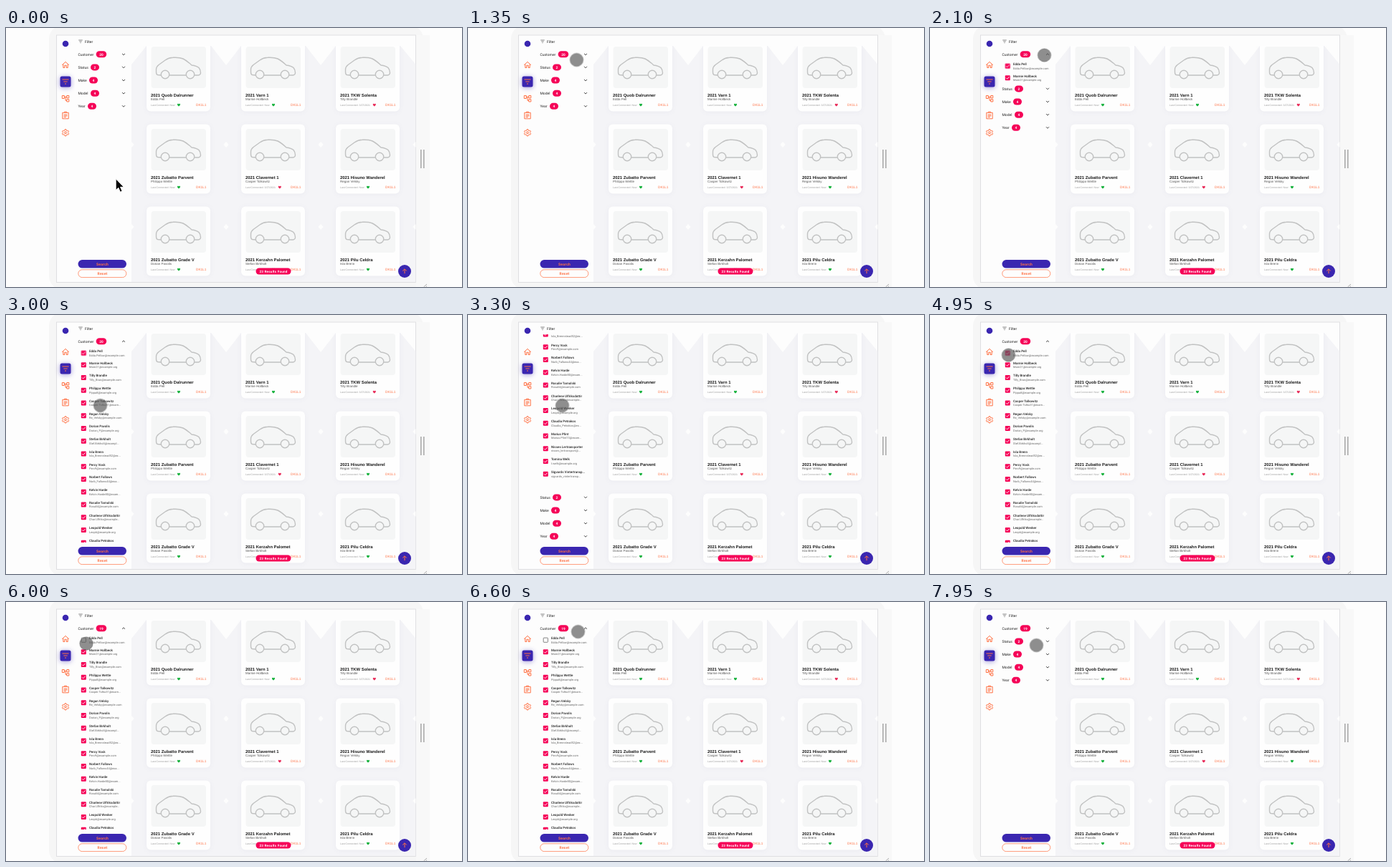
These frames come from a looping animation (636x362 px, 8000 ms). An HTML page:

```html
<!DOCTYPE html>
<html lang="en">
<head>
<meta charset="utf-8">
<title>Vehicle filter</title>
<style>
html, body { margin: 0; width: 100%; height: 100%; overflow: hidden; background: #fdfdfd; }
svg { display: block; width: 636px; height: 362px; }
text { font-family: Roboto, "Open Sans", sans-serif; font-size: 5px; fill: #222; text-rendering: geometricPrecision; }
.card text { font-family: "Liberation Sans", Arial, sans-serif; }
.card .title { font-size: 5.9px; font-weight: 700; fill: #1c1c1c; }
.card .owner { font-size: 4.5px; fill: #555; }
.card .seen { font-size: 3.5px; fill: #999; }
.card .code { font-size: 4.7px; fill: #ff7043; }
.card > rect:first-child { filter: drop-shadow(0 1.5px 3px rgba(60, 60, 110, .05)); }
.badge { font-size: 4.8px; font-weight: 700; fill: #fff; text-anchor: middle; }
.name { font-size: 4.5px; font-weight: 500; }
.mail { font-size: 4px; fill: #666; }
.btn { font-weight: 700; letter-spacing: .25px; text-anchor: middle; fill: #ff7043; }
.found { font-size: 4.6px; font-weight: 700; letter-spacing: .2px; fill: #fff; text-anchor: middle; }
.line { fill: none; stroke: #333; stroke-width: .9; }
.icon { fill: none; stroke: #ff7043; stroke-width: 1; stroke-linejoin: round; }
.active { fill: #3a26b0; filter: drop-shadow(0 1.5px 3.5px rgba(58, 38, 176, .45)); }

#scroll, #rest, #flip, #arrow, #touch, .before, .after { animation: 8s step-end infinite; }
#scroll { animation-name: scroll; }
#rest { animation-name: expand; }
#flip { animation-name: flip; }
#arrow { animation-name: arrow; }
#touch { animation-name: touch; }
.before { animation-name: before; }
.after { animation-name: after; }

@keyframes scroll {
  0% { transform: translateY(0); }
  39.37% { transform: translateY(-70px); }
  41.24% { transform: translateY(-167px); }
  48.74% { transform: translateY(-100.5px); }
  50.62%, 100% { transform: translateY(0); }
}
@keyframes expand {
  0% { transform: translateY(0); }
  26.24% { transform: translateY(30px); }
  28.12% { transform: translateY(240px); }
  29.99% { transform: translateY(367px); }
  91.87% { transform: translateY(270px); }
  93.74% { transform: translateY(50px); }
  95.62%, 100% { transform: translateY(0); }
}
@keyframes flip {
  0% { transform: scaleY(1); }
  26.24% { transform: scaleY(-1); }
  91.87%, 100% { transform: scaleY(1); }
}
@keyframes before { 0% { opacity: 1; } 67.49%, 100% { opacity: 0; } }
@keyframes after { 0% { opacity: 0; } 67.49%, 100% { opacity: 1; } }
@keyframes arrow { 0% { opacity: 1; } 11.24%, 100% { opacity: 0; } }
@keyframes touch {
  0% { opacity: 0; transform: translate(153px, 211px); }
  11.24% { opacity: 1; transform: translate(150px, 190px); }
  13.12% { transform: translate(148px, 132px); }
  14.99% { transform: translate(148px, 74px); }
  16.87% { transform: translate(151.5px, 44.5px); }
  18.74% { transform: translate(156px, 40px); }
  20.62% { transform: translate(158.5px, 38.5px); }
  22.49% { transform: translate(159.5px, 38px); }
  29.99% { transform: translate(157px, 48px); }
  31.87% { transform: translate(149px, 76px); }
  33.74% { transform: translate(140px, 104px); }
  35.62% { transform: translate(133px, 121px); }
  37.49% { transform: translate(131.5px, 126.5px); }
  56.24% { transform: translate(135px, 127px); }
  58.12% { transform: translate(126px, 98px); }
  59.99% { transform: translate(114px, 66px); }
  61.87% { transform: translate(109.5px, 56px); }
  74.99% { transform: translate(112px, 58px); }
  76.87% { transform: translate(126px, 55px); }
  78.74% { transform: translate(142px, 48px); }
  80.62% { transform: translate(151px, 43px); }
  82.49% { transform: translate(153.5px, 41.5px); }
  95.62% { transform: translate(152.5px, 46px); }
  97.49% { transform: translate(150px, 55px); }
  99.37%, 100% { opacity: 1; transform: translate(148.5px, 60.5px); }
}
</style>
</head>
<body>
<svg viewBox="0 0 636 362">
  <defs>
    <clipPath id="panel"><rect x="96" y="27.5" width="78" height="290.5"/></clipPath>
    <clipPath id="grid"><rect x="175" y="25" width="396.5" height="330"/></clipPath>
    <g id="car" fill="none" stroke="#c1c2c2" stroke-width="1.4" stroke-linecap="round" stroke-linejoin="round">
      <circle cx="26" cy="45.5" r="5.700"/>
      <circle cx="61" cy="45.5" r="5.700"/>
      <path d="M20 46.500L15.500 46Q13.500 45.500 13.500 42V38Q13.500 35 17 32L26 25.500Q31 22 37 21.800Q46 21.300 51 23.500Q56 26 63 32.500Q70 33.500 73 36Q75.500 39 75.500 43Q75.500 46 72 46.500H67M32 46.500H55"/>
    </g>
    <path id="heart" d="M0 1.900C-3 -.1 -2.100 -1.900 -1 -1.900Q-.3 -1.900 0 -1.200Q.3 -1.900 1 -1.900C2.100 -1.900 3 -.1 0 1.900Z"/>
    <path id="chevron" class="line" d="M-2 -1L0 1L2 -1"/>
    <path id="bars" d="M-4.500 -3H4.500M-2.700 0H2.700M-1 3H1"/>
    <g id="checked">
      <rect x="-3.500" y="-3.500" width="7" height="7" rx=".9" fill="#f50057"/>
      <path d="M-2.200 0L-.7 1.500L2.300 -1.600" fill="none" stroke="#fff" stroke-width=".95"/>
    </g>
  </defs>

  <rect x="60" y="-3" width="522" height="368" rx="18" fill="#f6f6f6"/>
  <path d="M572 10H591V362H572Z" fill="#f8f8f8"/>
  <rect x="70.500" y="10" width="501" height="345.500" fill="#fdfdfd" stroke="#d9d9dc" stroke-width=".8"/>
  <path d="M578.800 170V196M582.800 170V196" stroke="#aaa" stroke-width="1.600"/>
  <path d="M582.500 362L587 358M585.500 362L587 360.700" stroke="#999" stroke-width=".8"/>

  <g clip-path="url(#grid)">
    <path d="M175 51L196 25H286L307 52L328 25H418L439 52L460 25H550L571.500 51V355H175Z" fill="#f4f4f7"/>
    <g id="gems" fill="#fdfdfd"></g>
    <g id="cards"></g>
  </g>

  <rect x="348.500" y="335.500" width="49" height="9" rx="4.500" fill="#f50057"/>
  <text class="found" x="373" y="341.700">23 Results Found</text>
  <circle cx="556" cy="340" r="9" fill="#3a26b0"/>
  <path class="icon" d="M556 343.200V337M553.200 339.600L556 336.800L558.800 339.600"/>

  <circle cx="83" cy="22" r="4.300" fill="#3a26b0"/>
  <path class="icon" d="M78.300 51.700L83 47.300L87.700 51.700M79.800 50.500V55.500H81.800V52.300H84.200V55.500H86.200V50.500"/>
  <rect class="active" x="75.500" y="67.500" width="15" height="15" rx="2.500"/>
  <use href="#bars" x="83" y="75" class="icon"/>
  <path class="icon" d="M78.300 94.500H81.300V98.500H78.300ZM84.800 94.500H87.800V97.800H84.800ZM84.800 99.700H87.800V103H84.800ZM81.300 96.300H84.800M83 96.300V101.300H84.800"/>
  <path class="icon" d="M78.800 118.300H87.200V126.800H78.800ZM81.500 118V117.200H84.500V118M80.600 121H85.400M80.600 122.800H85.400M80.600 124.600H83.800"/>
  <g class="icon" transform="translate(77 140.300) scale(.5)" style="stroke-width:2">
    <path d="M10 3H14L14.500 5.800L16.500 7L19.200 6L21.200 9.400L19 11.200V12.800L21.200 14.600L19.200 18L16.500 17L14.500 18.200L14 21H10L9.500 18.200L7.500 17L4.800 18L2.800 14.600L5 12.800V11.200L2.800 9.400L4.800 6L7.500 7L9.500 5.800Z"/>
    <circle cx="12" cy="12" r="2.800"/>
  </g>

  <g transform="translate(104 18.800) scale(.62)"><use href="#bars" class="line"/></g>
  <text x="110" y="20.700">Filter</text>

  <g clip-path="url(#panel)">
    <g id="scroll">
      <g id="list"></g>
      <path d="M96 20H174V45H96Z" fill="#fdfdfd"/>
      <text x="100.500" y="38.500">Customer</text>
      <rect x="125.700" y="32.200" width="14.500" height="9" rx="4.500" fill="#f50057"/>
      <text class="badge before" x="133" y="38.500">20</text>
      <text class="badge after" x="133" y="38.500">19</text>
      <g transform="translate(164 36.800)"><g id="flip"><use href="#chevron"/></g></g>
      <g id="rest"></g>
    </g>
  </g>

  <rect x="100.500" y="324" width="67.500" height="11.600" rx="5.800" fill="#3a26b0"/>
  <text class="btn" x="134.500" y="331.600">Search</text>
  <rect x="100.800" y="337.800" width="67" height="10.800" rx="5.400" fill="#fdfdfd" stroke="#ff7043" stroke-width=".7"/>
  <text class="btn" x="134.500" y="345">Reset</text>

  <path id="arrow" d="M153.200 210.800V226.600L156.800 223.300L159.400 229.200L162 228.100L159.500 222.300H164.300Z" fill="#000" stroke="#fff" stroke-width=".9"/>
  <circle id="touch" r="9.300" fill="rgba(88,88,88,.68)" stroke="rgba(90,90,90,.5)" stroke-width=".6"/>
</svg>

<script>
const fill = (id, html) => { document.getElementById(id).innerHTML = html; };

const people = [
  ["Edda Pell", "Edda.Pellow@example.com"],
  ["Marnie Hollbeck", "Marn21@example.org"],
  ["Tilly Brandle", "Tilly_Bran@example.com"],
  ["Philippa Wettle", "Pippa8@example.org"],
  ["Casper Tolkowitz", "Casper.Tolko31@exam..."],
  ["Regan Velsky", "Re_Velsky@example.com"],
  ["Dorian Pavolis", "Dorian_P@example.org"],
  ["Stefan Birkholt", "Stef.Birkholt@exampl..."],
  ["Isla Brenn", "Isla_Brennstead52@ex..."],
  ["Percy Vosk", "Perc9@example.com"],
  ["Norbert Fallows", "Norb_Fallows44@exa..."],
  ["Kelvin Harde", "Kelvin.Harde80@exam..."],
  ["Rosalie Tarnolski", "Rosali4@example.com"],
  ["Charlene Ulfriksdottir", "Char.Ulfriks@example..."],
  ["Leopold Wenker", "Leop6@example.org"],
  ["Claudia Petrakos", "Claudia_Petrakos@ex..."],
  ["Marius Plint", "Marius.Plint73@exam..."],
  ["Nisses Lertransporter", "nisses_lertransport@..."],
  ["Tomina Welk", "t.welk@example.org"],
  ["Sigvards Vintertransp...", "sigvards_vintertransp..."]
];
const cars = ["Quob Dalrunner", "Varn 1", "TKW Solenta", "Zubatto Parvent", "Clavernet 1",
  "Hisuno Wanderel", "Zubatto Grade V", "Kerzahn Palomet", "Pilu Celdra"];
const late = [2, 4];

fill("cards", cars.map((car, i) => {
  const x = 196 + 132 * (i % 3), y = 19.5 + 115 * Math.floor(i / 3), old = late.includes(i);
  return `<g class="card" transform="translate(${x} ${y})">
    <rect width="89" height="97" rx="6" fill="#fefefe"/>
    <rect x="6.5" y="6.5" width="76.500" height="58" rx="4" fill="#f5f6f6"/>
    <use href="#car"/>
    <text class="title" x="6" y="76.200">2021 ${car}</text>
    <text class="owner" x="6" y="81.800">${people[i][0]}</text>
    <text class="seen" x="6" y="89.300">Last Connected: ${old ? "3/27/2021" : "Now"}</text>
    <use href="#heart" x="${old ? 53.8 : 45}" y="88.200" fill="${old ? "#e82a58" : "#16b13c"}"/>
    <text class="code" x="69" y="89.500">DK1L1</text>
  </g>`;
}).join(""));

fill("gems", [163, 278].map(y => [175, 307, 439, 571].map(x =>
  `<path d="M${x - 3.5} ${y}l3.500 -4l3.500 4l-3.500 4z"/>`).join("")).join(""));

fill("list", people.map(([name, mail], i) => {
  const y = i ? 49.3 + 17.75 * i : 50.5;
  const box = `<use href="#checked" x="108.300" y="${y + 2.7}"${i ? "" : ' class="before"'}/>`;
  const empty = i ? "" : `<rect class="line after" x="105.200" y="${y - .4}" width="6.200" height="6.200" rx=".7" style="stroke:#666;stroke-width:.8"/>`;
  return `${empty}${box}<text class="name" x="116" y="${y + 1.6}">${name}</text>
    <text class="mail" x="116" y="${y + 7}">${mail}</text>`;
}).join(""));

const groups = [["Status", 2, 118], ["Make", 4, 116], ["Model", 4, 118], ["Year", 4, 114]];
fill("rest", '<path d="M96 45H174V700H96Z" fill="#fdfdfd"/>' + groups.map(([label, count, x], i) => {
  const y = 54.8 + 18.15 * i;
  return `<text x="100.500" y="${y + 1.8}">${label}</text>
    <rect x="${x}" y="${y - 4.4}" width="12" height="9" rx="4.500" fill="#f50057"/>
    <text class="badge" x="${x + 6}" y="${y + 1.8}">${count}</text>
    <use href="#chevron" x="164" y="${y}"/>`;
}).join(""));
</script>
</body>
</html>
```
